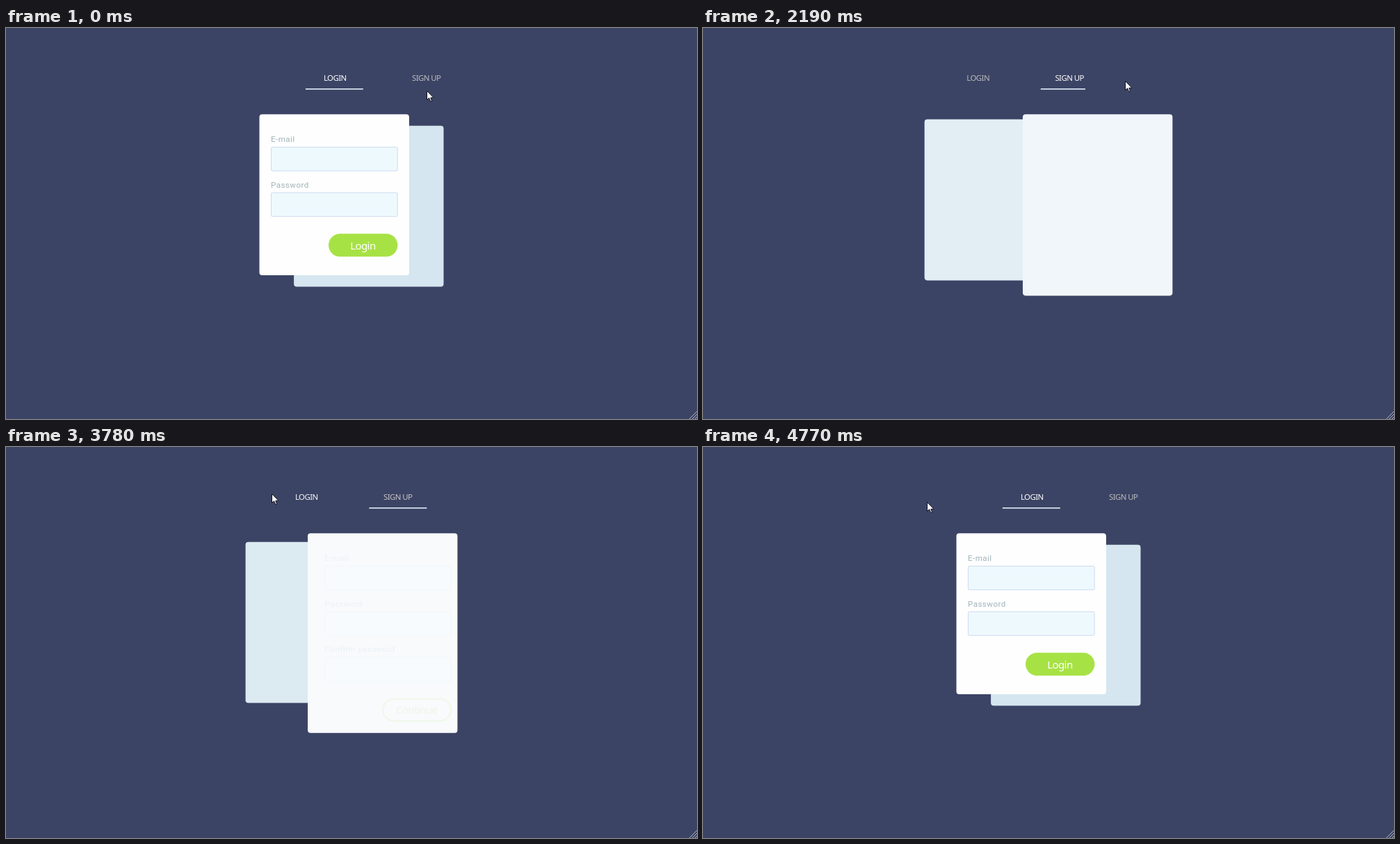
An HTML page with a canvas for the animation above (5.51 s loop, 994 by 563 pixels).

```html
<!DOCTYPE html>
<html lang="en">
<head>
<meta charset="utf-8">
<title>Login and sign up cards</title>
<style>
  html, body { margin: 0; width: 100%; height: 100%; overflow: hidden; background: #3c4465; }
  canvas { display: block; }
</style>
</head>
<body>
<canvas id="stage" width="994" height="563"></canvas>
<script>
const ctx = document.getElementById('stage').getContext('2d');
const LOOP = 5510, TO_SIGNUP = 1750, TO_LOGIN = 3606;
const SWAP = 345, SETTLE = 560;            // ms after a click: cards apart, cards at rest
const SHIFT = 82.9, DROP = 16.6, CARD_W = 215.4;
const GREEN = '#a7e245', UI = '"Noto Sans", sans-serif';

const panels = [
  { side: -1, cardX: 281.6, low: 231.8, high: 231.8, labels: ['E-mail', 'Password'], button: 'Login',
    tab: 'LOGIN', tabX: 348, textX: 26 },
  { side: 1, cardX: 497, low: 231.8, high: 297.8, labels: ['E-mail', 'Password', 'Confirm password'], button: 'Continue',
    tab: 'SIGN UP', tabX: 563.4, textX: 20.6 }
];

// time, x, y of the pointer tip
const pointerPath = [
  [0, 605, 90], [1290, 605, 90], [1320, 605, 86], [1560, 606, 76], [1760, 607, 76], [2750, 607, 76],
  [2800, 604, 74], [3050, 520, 48], [3340, 406, 59], [3580, 382, 67], [3930, 382, 67],
  [4490, 322, 80], [4769, 322, 80], [4770, 322, 79], [LOOP, 322, 79]
];

const ramp = (v, from, to) => Math.min(1, Math.max(0, (v - from) / (to - from)));
const mix = (a, b, p) => a + (b - a) * p;
const blend = (a, b, p) => `rgb(${a.map((v, i) => mix(v, b[i], p)).join()})`;
const easeOut = p => 1 - (1 - p) ** 2;

function box(x, y, w, h, r, fill, stroke, line = 1) {
  ctx.beginPath();
  ctx.roundRect(x, y, w, h, r);
  if (fill) { ctx.fillStyle = fill; ctx.fill(); }
  if (stroke) { ctx.strokeStyle = stroke; ctx.lineWidth = line; ctx.stroke(); }
}

function text(str, x, y, font, spacing, fill, align = 'left') {
  ctx.font = font;
  ctx.letterSpacing = spacing + 'px';
  ctx.textAlign = align;
  ctx.fillStyle = fill;
  ctx.fillText(str, x, y);
}

function drawTab(panel, active, e) {
  const moved = easeOut(ramp(e, 0, 590));
  const x = panel.tabX - panel.side * SHIFT * (active ? moved : 1 - moved);
  const tint = ramp(e, 0, 200);
  const color = blend([187, 187, 187], [255, 255, 255], active ? tint : 1 - tint);
  text(panel.tab, x + panel.textX, 75.6, '11.4px ' + UI, -0.55, color);

  const hidden = active ? 1 - easeOut(ramp(e, 310, SETTLE)) : ramp(e, 225, 300);
  const offset = -panel.side * hidden * SHIFT;
  const left = Math.max(x, x + offset), right = Math.min(x, x + offset) + SHIFT;
  ctx.fillStyle = '#dbe6f3';
  if (right > left) ctx.fillRect(left, 87, right - left, 1.7);
}

function drawFields(panel, active, e) {
  const shown = active ? ramp(e, 530, 880) : 1 - ramp(e, 0, 200);
  if (!shown) return;
  ctx.globalAlpha = shown;
  ctx.translate(panel.side * 9 * (1 - shown), 0);
  panel.labels.forEach((label, i) => {
    const y = i * 65.6;
    text(label, 16.6, 39.8 + y, '11.6px Roboto, sans-serif', 0.41, '#a0b4b9');
    box(17, 47.3 + y, 181.6, 34.2, 1.7, '#eef9fe', '#cddbee');
  });
  const y = 172 + (panel.labels.length - 2) * 65.8;
  const solid = panel.side < 0;
  if (solid) box(99.5, y, 99.4, 33.1, 16.6, GREEN);
  else box(100.3, y + 0.8, 97.8, 31.5, 15.8, null, GREEN, 1.7);
  text(panel.button, 148.9, y + 22.4, '15px ' + UI, -0.6, solid ? '#fff' : GREEN, 'center');
}

function drawCard(panel, active, e) {
  const inward = e < SWAP ? 1 - (e / SWAP) ** 2.1 : ramp(e, SWAP, SETTLE);
  const dropped = active === (e < SWAP) ? inward : 0;
  const tint = ramp(e, 0, SETTLE) ** 1.6;
  const grown = active ? ramp(e, SWAP, SETTLE) : 1 - tint;
  ctx.save();
  ctx.translate(panel.cardX - panel.side * SHIFT * inward, 124.2 + DROP * dropped);
  box(0, 0, CARD_W, mix(panel.low, panel.high, grown), 4.1,
    blend([214, 230, 240], [254, 254, 254], active ? tint : 1 - tint));
  drawFields(panel, active, e);
  ctx.restore();
}

function drawPointer(t) {
  const i = pointerPath.findIndex(p => p[0] > t);
  const [a, b] = [pointerPath[i - 1], pointerPath[i]];
  const p = ramp(t, a[0], b[0]);
  ctx.save();
  ctx.translate(Math.round(mix(a[1], b[1], p)) + 0.5, Math.round(mix(a[2], b[2], p)) + 0.5);
  const shape = new Path2D('M0 0V13L3 10.2L5.2 15H7.2L5.3 9.8H9.4Z');
  ctx.fillStyle = '#fff';
  ctx.strokeStyle = '#10121c';
  ctx.lineWidth = 1;
  ctx.fill(shape);
  ctx.stroke(shape);
  ctx.restore();
}

function drawGrip() {
  ctx.strokeStyle = '#b3b6c0';
  ctx.lineWidth = 1;
  ctx.beginPath();
  for (const d of [11, 7, 3]) {
    ctx.moveTo(994 - d, 563);
    ctx.lineTo(994, 563 - d);
  }
  ctx.stroke();
}

function draw(t) {
  const current = t >= TO_SIGNUP && t < TO_LOGIN ? 1 : 0;
  const e = t < TO_SIGNUP ? LOOP : t - (current ? TO_SIGNUP : TO_LOGIN);
  ctx.fillStyle = '#3c4465';
  ctx.fillRect(0, 0, 994, 563);
  panels.forEach((panel, i) => drawTab(panel, i === current, e));
  const top = e < SWAP ? 1 - current : current;
  for (const i of [1 - top, top]) drawCard(panels[i], i === current, e);
  drawGrip();
  drawPointer(t);
}

const start = performance.now();
function frame() {
  draw((performance.now() - start) % LOOP);
  requestAnimationFrame(frame);
}
frame();
</script>
</body>
</html>
```
